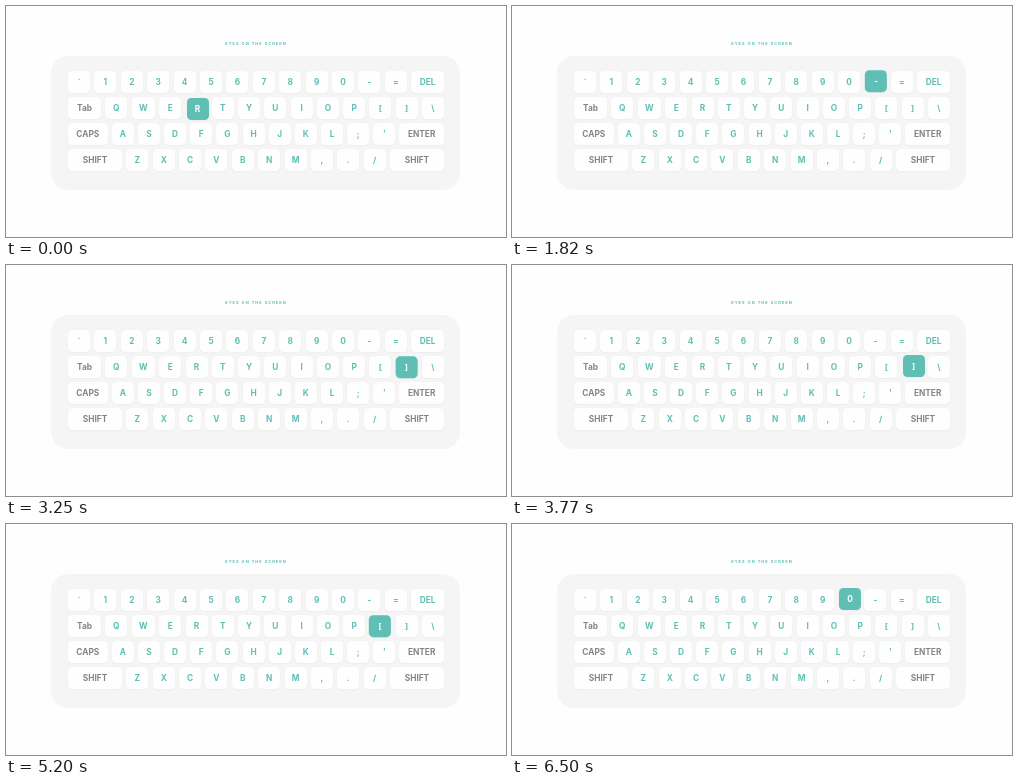
An HTML page that plays this animation: 500x231 px, repeating every 6.63 s.

```html
<!DOCTYPE html>
<html lang="en">
<head>
<meta charset="utf-8">
<title>Keyboard</title>
<style>
  html, body { margin: 0; width: 100%; height: 100%; overflow: hidden; background: #fefefe; }
  body { position: relative; font-family: Inter, sans-serif; color: #5fbfb5; }
  h1 {
    position: absolute; left: 0; top: 35px; width: 500px; margin: 0;
    font-size: 4px; line-height: 6px; font-weight: 700;
    letter-spacing: 1px; text-align: center;
  }
  #board {
    position: absolute; left: 45px; top: 49.5px; width: 409px; height: 134.5px;
    border-radius: 17px; background: #f5f5f5;
  }
  .row {
    position: absolute; left: 17px; width: 376px; height: 22px;
    display: flex; justify-content: space-between;
  }
  .key {
    flex: none; width: 22px; height: 22px; border-radius: 4.5px;
    background: #fefefe; box-shadow: 0 .5px 1.5px rgba(0, 0, 0, .05);
    font-size: 8.3px; line-height: 22px; font-weight: 700; text-align: center;
  }
  .mod { color: #858585; }
  .on { background: #5fbfb5; color: #fff; }
</style>
</head>
<body>
<h1>EYES ON THE SCREEN</h1>
<div id="board"></div>
<script>
const LOOP = 6630, STEP = 130, SHAKE = 300;
const rows = [
  '` 1 2 3 4 5 6 7 8 9 0 - = DEL',
  'Tab Q W E R T Y U I O P [ ] \\',
  'CAPS A S D F G H J K L ; \' ENTER',
  'SHIFT Z X C V B N M , . / SHIFT'
];
const widths = { DEL: 32.6, Tab: 33, CAPS: 39.6, ENTER: 44.4, SHIFT: 54, W: 23.6 };
const keys = {};

rows.forEach((labels, i) => {
  const row = document.createElement('div');
  row.className = 'row';
  row.style.top = 15.5 + i * 26.1 + 'px';
  for (const label of labels.split(' ')) {
    const key = document.createElement('div');
    key.className = label.length > 1 && label !== 'DEL' ? 'key mod' : 'key';
    key.textContent = label;
    if (widths[label]) key.style.width = widths[label] + 'px';
    keys[label] = key;
    row.append(key);
  }
  document.getElementById('board').append(row);
});

// Key to press and the time its shake begins
const presses = [
  ['R', -180], ['-', 670], ['1', 1950], [']', 3230],
  ['[', 4290], ['N', 5240], ['0', 5960]
];
const shakeX = [0, -1, -1, 1, 1, 0];
const shakeY = [0, 1, -1, 1, -1, 0];

function along(points, p) {
  const i = Math.floor(p);
  return points[i] + (points[i + 1] - points[i]) * (p - i);
}

let active;
function draw(now) {
  const t = Math.floor((now % LOOP) / STEP) * STEP;
  const [label, start] = presses.filter(p => p[1] <= t).pop();
  const key = keys[label];
  if (key !== active) {
    if (active) {
      active.classList.remove('on');
      active.style.transform = '';
    }
    key.classList.add('on');
    active = key;
  }
  const p = ((t - start) % SHAKE) / SHAKE * 5;
  key.style.transform = `translate(${along(shakeX, p)}px, ${along(shakeY, p)}px)`;
}

const begin = performance.now();
function tick() {
  draw(performance.now() - begin);
  requestAnimationFrame(tick);
}
tick();
</script>
</body>
</html>
```
